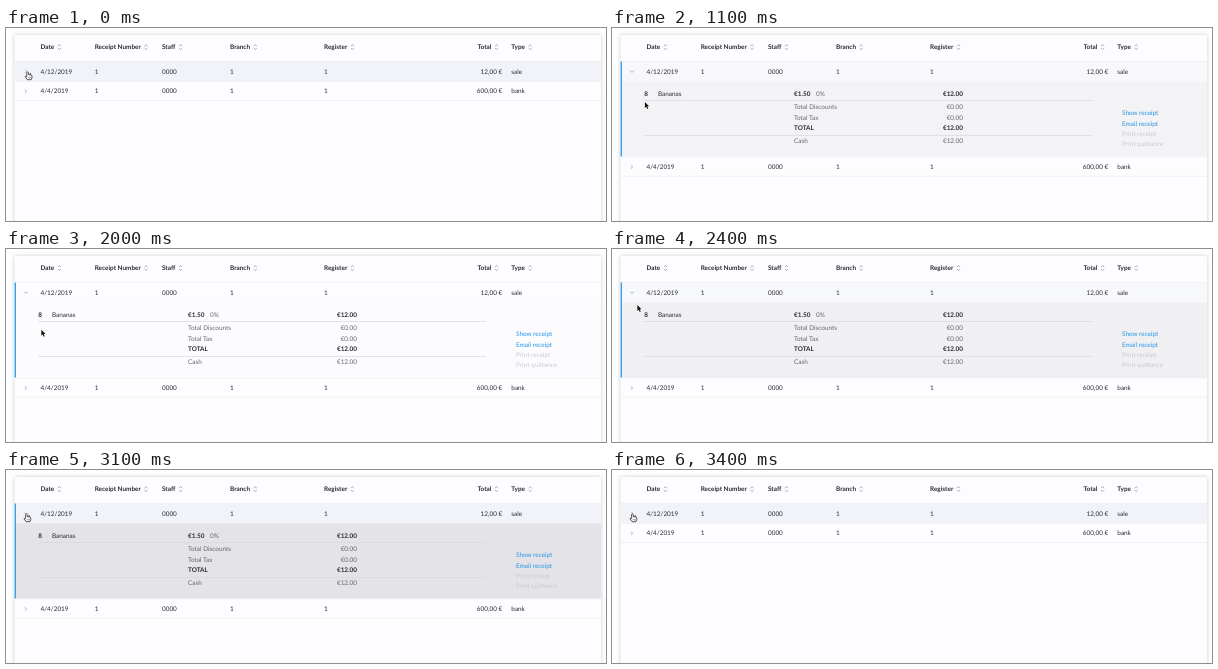
An HTML page for the animation above (4.2 s loop, 600 px wide and 193 px high).

```html
<!DOCTYPE html>
<html lang="en">
<head>
<meta charset="utf-8">
<style>
  html, body { margin: 0; width: 100%; height: 100%; overflow: hidden; background: #fff; }
  svg { display: block; width: 100vw; height: 100vh; }
  text { font: 6.4px Lato, sans-serif; fill: #2b2b30; text-rendering: geometricPrecision; }
  #first text, #second text { font-kerning: none; }
  .b { font-weight: 700; }
  .end { text-anchor: end; }
  .dim { fill: #66666b; }
  .link { fill: #2594e6; }
  .off { fill: #cacace; }
  .icon { fill: none; stroke: #85858b; stroke-width: .65; }
  .rule { stroke: #d9d9de; stroke-width: .7; }
  .edge { stroke: #ededf0; stroke-width: .7; }
  #card { filter: drop-shadow(0 0 2px #0003); }
</style>
</head>
<body>
<svg viewBox="0 0 600 193">
  <rect id="card" x="8.5" y="7" width="586.5" height="200" rx="1" fill="#fdfcfe"/>
  <rect id="row" x="8.5" y="33.5" width="586.5" height="19.8"/>
  <path class="edge" d="M8.5 33.4H595"/>
  <g id="head"></g>
  <g id="first"></g>
  <path id="chev" class="icon" d="M-.8-1.7L.9 0L-.8 1.7"/>
  <g id="detail">
    <rect id="panel" x="8.5" y="53.3" width="586.5" height="75.4"/>
    <path class="rule" d="M32 72.5H480M32 107.5H480"/>
    <rect x="8.6" y="33.5" width="1.4" height="95.2" fill="#35a0ec"/>
  </g>
  <g id="second">
    <path class="edge" d="M8.5 53.2H595M8.5 72.6H595"/>
    <path class="icon" d="M18.9 61.6L20.6 63.3L18.9 65"/>
  </g>
  <g id="hand">
    <path d="M-.8 .7Q0-.5.8.7V3Q1.7 2.5 2.2 3.3Q3-.1 3.1 3.5Q4.3 3.2 4.4 4.4V5.8L3.6 8H-.3L-2.4 5.1Q-2.5 3.9-.8 4.9Z"
      fill="#fff" stroke="#25252a" stroke-width=".75" stroke-linejoin="round"/>
    <path d="M.8 5.2V6.7M2 5.2V6.7M3.2 5.2V6.7" stroke="#25252a" stroke-width=".4"/>
  </g>
  <path id="arrow" d="M0 0V6L1.4 4.8L2.4 7.1L3.4 6.6L2.4 4.4H4.2Z"
    fill="#111" stroke="#fff" stroke-width=".6" paint-order="stroke"/>
</svg>
<script>
const $ = id => document.getElementById(id);

function add(parent, name, attrs, content = "") {
  const el = document.createElementNS("http://www.w3.org/2000/svg", name);
  for (const key in attrs) el.setAttribute(key, attrs[key]);
  el.textContent = content;
  $(parent).append(el);
  return el;
}
const label = (parent, x, y, content, cls = "") =>
  add(parent, "text", { x, y, class: cls }, content);

const columns = { "Date": 34.5, "Receipt Number": 88.7, "Staff": 156, "Branch": 224,
  "Register": 318, "Total": 471.5, "Type": 505.3 };

// Each heading is followed by its sort icon
for (const [name, x] of Object.entries(columns)) {
  const width = label("head", x, 21.1, name, "b").getComputedTextLength();
  add("head", "path", { class: "icon",
    d: `M${x + width + 3.6} 18.1l1.6-1.4l1.6 1.4m-3.2 2l1.6 1.4l1.6-1.4` });
}

function tableRow(parent, y, ...values) {
  Object.entries(columns).forEach(([name, x], i) => name === "Total"
    ? label(parent, 496.2, y, values[i], "end")
    : label(parent, x, y, values[i]));
}
tableRow("first", 45.7, "4/12/2019", "1", "0000", "1", "1", "12,00 €", "sale");
tableRow("second", 65.4, "4/4/2019", "1", "0000", "1", "1", "600,00 €", "bank");

function sumLine(y, name, sum, cls) {
  label("detail", 182, y, name, cls);
  label("detail", 351, y, sum, cls + " end");
}
label("detail", 32.3, 68, "8", "b");
label("detail", 46, 68, "Bananas");
label("detail", 204, 68, "0%", "dim");
sumLine(68, "€1.50", "€12.00", "b");
sumLine(81, "Total Discounts", "€0.00", "dim");
sumLine(91.6, "Total Tax", "€0.00", "dim");
sumLine(102, "TOTAL", "€12.00", "b");
sumLine(115.1, "Cash", "€12.00", "dim");
["Show receipt", "Email receipt", "Print receipt", "Print quittance"].forEach((name, i) =>
  label("detail", 510, 87.2 + i * 10.3, name, i < 2 ? "link" : "off"));

const ramp = (t, from, to) => Math.min(1, Math.max(0, (t - from) / (to - from)));
const smooth = p => p * p * (3 - 2 * p);
const easeOut = p => 1 - (1 - p) ** 3;
const lerp = (a, b, p) => a + (b - a) * p;
const mix = (a, b, p) => `rgb(${a.map((v, i) => lerp(v, b[i], p))})`;

function draw(now) {
  const t = Math.floor(now % 4200 / 100) * 100; // the screen refreshes ten times a second
  const open = t >= 400 && t < 3200;
  const away = easeOut(ramp(t, 900, 1400)) - smooth(ramp(t, 1900, 2700));
  const hover = 1 - smooth(ramp(t, 900, 1250)) + smooth(ramp(t, 2200, 2600));
  const turn = 90 * (ramp(t, 300, 500) - ramp(t, 3100, 3400));
  const x = lerp(t < 1900 ? 21.6 : 20.4, 36, away), y = lerp(43.7, 82.3, away);
  const pointer = y < 53 ? "hand" : "arrow";

  $("row").setAttribute("fill", mix([253, 252, 254], [241, 243, 248], hover));
  $("panel").setAttribute("fill", mix([252, 252, 254], [228, 227, 231], hover));
  $("detail").style.display = open ? "" : "none";
  $("second").setAttribute("transform", `translate(0 ${open ? 75.7 : 0})`);
  $("chev").setAttribute("transform", `translate(20 43.5) rotate(${turn})`);
  for (const id of ["hand", "arrow"]) {
    $(id).setAttribute("transform", `translate(${x} ${y})`);
    $(id).style.display = id === pointer ? "" : "none";
  }
}

const start = performance.now();
function tick() {
  draw(performance.now() - start);
  requestAnimationFrame(tick);
}
tick();
</script>
</body>
</html>
```
